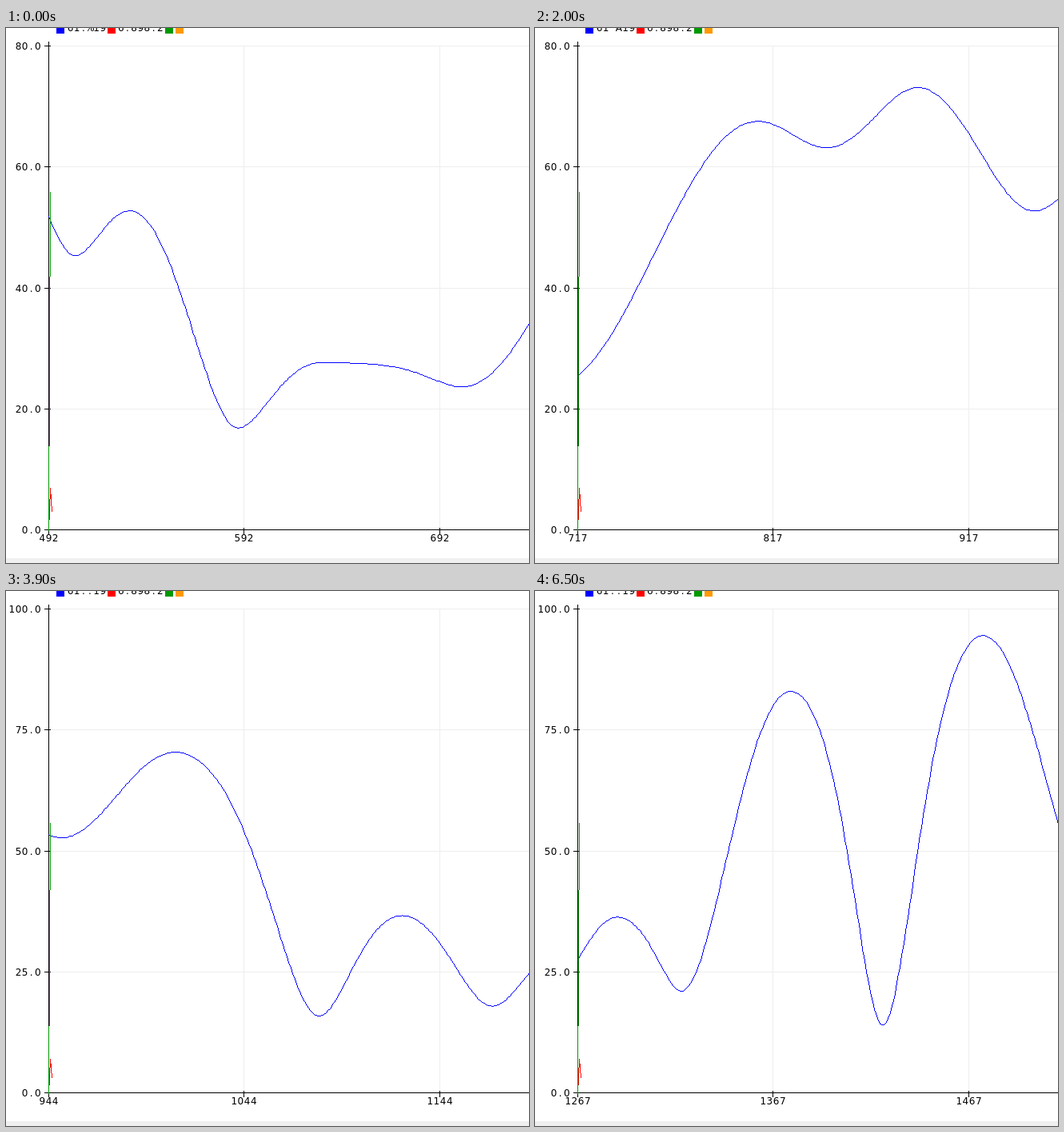
Write an HTML page that moves like this. It is 654 px wide and 669 px high and loops after 6600 ms.

```html
<!DOCTYPE html>
<html lang="en">
<head>
<meta charset="utf-8">
<title>Scrolling chart</title>
<style>
html, body { margin: 0; width: 100%; height: 100%; overflow: hidden; background: #fff; }
svg { display: block; width: 654px; height: 669px; }
path, rect { shape-rendering: crispEdges; }
text { font: 12px "DejaVu Sans", sans-serif; text-anchor: middle; fill: #000; }
</style>
</head>
<body>
<svg id="stage" viewBox="0 0 654 669"></svg>
<script>
const LOOP = 6600, LEFT = 53, BASE = 627.5, HEIGHT = 605, STEP = 2.445, CELL = 8.15;
const stage = document.getElementById('stage');

function add(name, attrs) {
  const el = document.createElementNS('http://www.w3.org/2000/svg', name);
  for (const key in attrs) el.setAttribute(key, attrs[key]);
  stage.appendChild(el);
  return el;
}
const box = (x, y, width, height, fill) => add('rect', { x, y, width, height, fill });

// Monospaced text: one cell per character, first cell centred on x
function write(el, str, x) {
  if (el.textContent === str) return;
  el.setAttribute('x', [...str].map((c, i) => (x + i * CELL).toFixed(2)).join(' '));
  el.textContent = str;
}
const centred = (el, str, x) => write(el, str, x - (str.length - 1) * CELL / 2);
const rightAligned = (el, str, x) => write(el, str, x - (str.length - 1) * CELL);

// Turning points of the signal: sample, value, skew of the swing that follows
const turns = [
  [480.5, 57, 0], [505.5, 45.4, -0.1], [533.7, 52.8, 0.125], [588.9, 16.9, -0.18],
  [631, 27.7, 0.65], [703.3, 23.7, 0], [809.2, 67.6, 0.03], [844.3, 63.25, 0.066],
  [891, 73.2, 0.055], [950.5, 52.8, -0.02], [1009, 70.5, 0.295], [1082.4, 15.95, -0.21],
  [1125, 36.7, 0.125], [1171, 18, -0.12], [1209.8, 30.3, 0.1], [1246.6, 18.1, -0.03],
  [1287.7, 36.4, 0.21], [1320.2, 21.1, -0.13], [1376.1, 83.05, 0.33],
  [1423.2, 14.05, -0.31], [1474.4, 94.6, 0], [1542.4, 30, 0]
];

// Index of the last row whose first entry is not beyond x, with a row after it
function rowAt(rows, x) {
  let i = 0;
  while (i < rows.length - 2 && rows[i + 1][0] <= x) i++;
  return i;
}

// Positive skew hurries the end of a swing, negative its start
const late = (u, c) => u - c * (u - u ** 3);
const warp = (u, c) => c < 0 ? 1 - late(1 - u, -c) : late(u, c);

function signal(s) {
  const i = rowAt(turns, s), [s0, v0, skew] = turns[i], [s1, v1] = turns[i + 1];
  const u = warp((s - s0) / (s1 - s0), skew);
  return v0 + (v1 - v0) * (1 - Math.cos(Math.PI * u)) / 2;
}

// Scroll position: time, first sample; sampled only when the chart repaints
const pace = [[0, 492], [800, 583], [1400, 640], [2600, 793], [3400, 898],
  [3900, 944], [4800, 1063], [5500, 1146], [6500, 1267]];
const repaints = [0, 100, 200, 500, 800, 3100, 3400, 3600, 3900, 4000, 4100, 4400, 4500,
  4800, 5000, 5200, 5500, 5700, 5900, 6200, 6500];
for (let t = 1000; t <= 2600; t += 100) repaints.push(t);

function scroll(t) {
  const i = rowAt(pace, t), [t0, a] = pace[i], [t1, b] = pace[i + 1];
  return Math.round(a + (b - a) * (t - t0) / (t1 - t0));
}

// Hard-edged line through whole pixels
function pixels(points) {
  let d = '';
  for (let i = 1; i < points.length; i++) {
    const [x0, y0] = points[i - 1], dx = points[i][0] - x0, dy = points[i][1] - y0;
    const n = Math.max(Math.abs(dx), Math.abs(dy));
    for (let k = 0; k < n; k++)
      d += `M${Math.round(x0 + dx * k / n)} ${Math.round(y0 + dy * k / n)}h1v1h-1z`;
  }
  return d;
}

const rows = [0, 1, 2, 3, 4].map(k => Math.floor(BASE - k * HEIGHT / 4));
const cols = [53, 297, 542];
box(0, 663, 654, 6, '#f0f0f0');
rows.slice(1).forEach(y => box(LEFT, y, 601, 1, '#eeeeee'));
cols.slice(1).forEach(x => box(x, 22, 1, HEIGHT, '#eeeeee'));
box(LEFT, 17, 1, 615, '#000');
box(48, 627, 606, 1, '#000');
rows.forEach(y => box(48, y, 8, 1, '#000'));
cols.forEach(x => box(x, 625, 1, 8, '#000'));
const [curve, red, green] = ['#0000ff', '#ff0000', '#009900'].map(fill => add('path', { fill }));
const yLabels = rows.map(y => add('text', { y: y + 5 }));
const xLabels = cols.map(() => add('text', { y: 641.5 }));

[[63, '#0000ff'], [127, '#ff0000'], [199, '#009900'], [212, '#ff9900']]
  .forEach(([x, c]) => box(x, -3, 10, 10, c));
const reading = add('text', { y: 4 });
write(add('text', { y: 4 }), '6.898.2', 143.8);

function draw(time) {
  const t = time % LOOP;
  const offset = scroll(Math.max(...repaints.filter(r => r <= t)));
  const top = t < 3400 ? 80 : 100;
  const trace = values => pixels(values.map((v, i) =>
    [Math.floor(LEFT + i * STEP), Math.round(BASE - v * HEIGHT / top)]));

  curve.setAttribute('d', trace(Array.from({ length: 248 }, (_, i) => signal(offset + i))));
  red.setAttribute('d', trace([0, 7, 3]));
  green.setAttribute('d', trace([0, 56]));
  yLabels.forEach((el, k) => rightAligned(el, (top * k / 4).toFixed(1), 39.9));
  xLabels.forEach((el, k) => centred(el, String(offset + 100 * k), cols[k] + 0.5));
  write(reading, t < 1000 ? '61.%19' : t < 2400 ? '61 A19' : '61..19', 80.5);
}

const begin = performance.now();
function tick() {
  draw(performance.now() - begin);
  requestAnimationFrame(tick);
}
tick();
</script>
</body>
</html>
```
